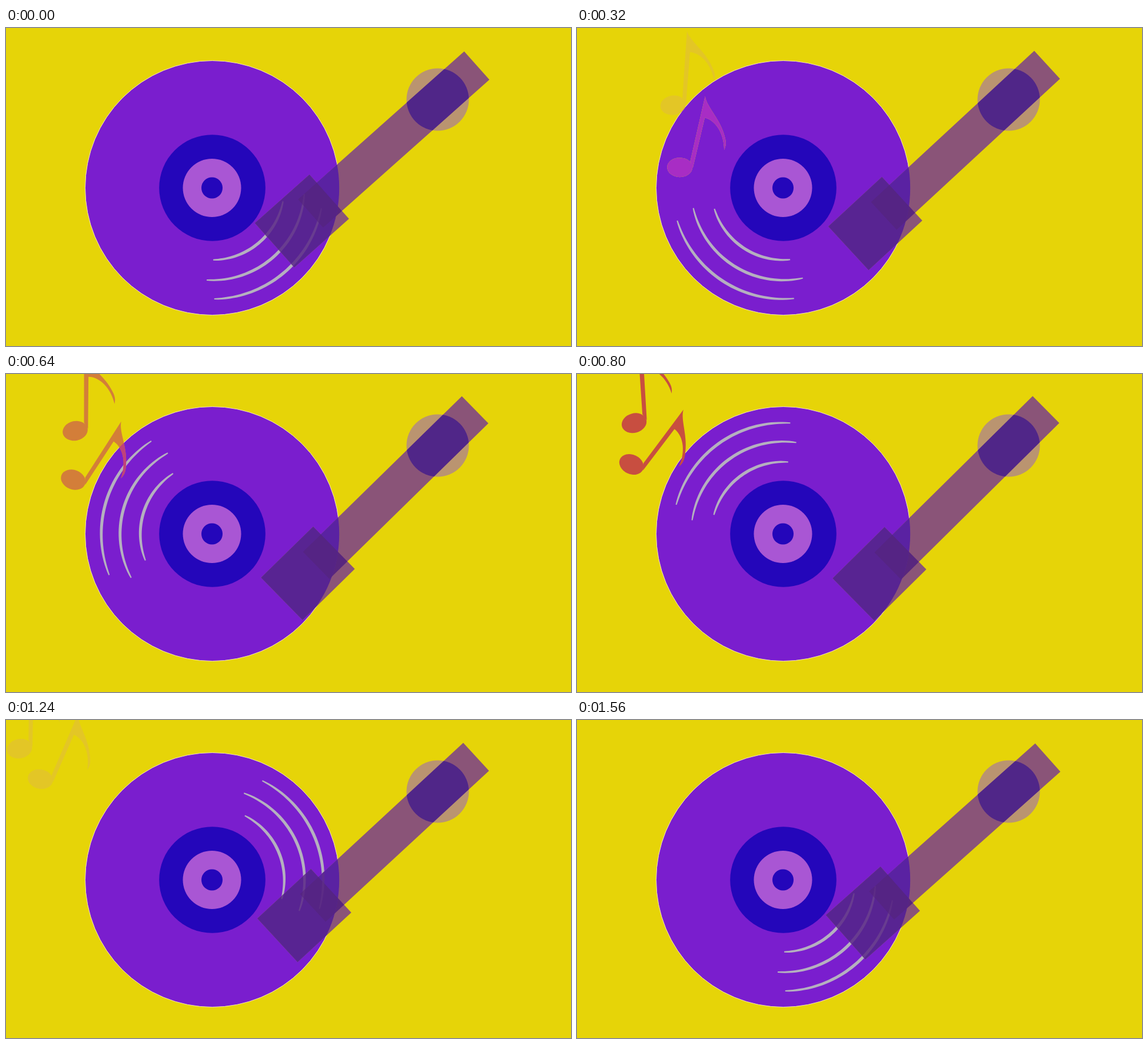
An HTML page with a canvas that plays this animation: 960 by 540 pixels, repeating every 1600 ms.

```html
<!DOCTYPE html>
<html lang="en">
<head>
<meta charset="utf-8">
<title>Turntable</title>
<style>
  html, body { margin: 0; width: 100%; height: 100%; overflow: hidden; background: #e6d408; }
  canvas { display: block; width: 960px; height: 540px; }
</style>
</head>
<body>
<canvas id="stage" width="960" height="540"></canvas>
<script>
const ctx = document.getElementById('stage').getContext('2d');
const TAU = Math.PI * 2, RAD = Math.PI / 180;
const STEP = 40, STEPS = 40, LAST = STEPS - 1;

const YELLOW = [230, 212, 8], PURPLE = [122, 30, 206], RED = [200, 76, 64];
const BLUE = '#2406ba', PINK = '#a956d4', GREY = '#b5b0bf';
const CX = 350.5, CY = 271.5;

const rgb = c => `rgb(${c.map(Math.round).join()})`;
const clamp = x => Math.min(1, Math.max(0, x));

function circle(x, y, r) {
  const p = new Path2D();
  p.arc(x, y, r, 0, TAU);
  return p;
}

const DISC = circle(CX, CY, 215.7);
const PIVOT = [733.5, 121.5];
const KNOB = circle(...PIVOT, 53);

function fill(path, color) {
  ctx.fillStyle = color;
  ctx.fill(path);
}

function clipped(path, draw) {
  ctx.save();
  ctx.clip(path);
  draw();
  ctx.restore();
}

// Arc that thins out towards both ends
function groove(r, from, to) {
  const p = new Path2D(), n = 40;
  const put = (s, side) => {
    const a = (from + (to - from) * s) * RAD;
    const q = r + side * (1 + 1.6 * Math.sin(Math.PI * s) ** .6);
    p.lineTo(CX + q * Math.cos(a), CY + q * Math.sin(a));
  };
  for (let i = 0; i <= n; i++) put(i / n, 1);
  for (let i = n; i >= 0; i--) put(i / n, -1);
  p.closePath();
  return p;
}

function drawRecord(turn) {
  fill(DISC, rgb(PURPLE));
  ctx.strokeStyle = '#f0dcbe';
  ctx.lineWidth = 1;
  ctx.stroke(circle(CX, CY, 216));
  fill(circle(CX, CY, 90.3), BLUE);
  fill(circle(CX - .5, CY, 49.5), PINK);
  fill(circle(CX - .5, CY, 18), BLUE);

  const grooves = [
    groove(122.3, turn + 10.7, turn + 89.3),
    groove(156.7, turn + 3.9, turn + 93.5),
    groove(188.6, turn + 10.6, turn + 89)
  ];
  grooves.forEach(g => fill(g, GREY));
  return grooves;
}

// The see-through arm: one flat tone for each overlap
function drawArm(swing, grooves) {
  const m = new DOMMatrix().translate(...PIVOT).rotate(138.35 - 3 * swing);
  const box = (...rect) => {
    const r = new Path2D(), p = new Path2D();
    r.rect(...rect);
    p.addPath(r, m);
    return p;
  };
  const arm = box(-88, -33.2, 378, 64.4);
  const head = box(247.3, -51.2, 124.2, 101);
  const joint = box(247.3, -33.2, 42.7, 64.4);
  const layer = (path, color, line) => clipped(path, () => {
    fill(path, color);
    grooves.forEach(g => fill(g, line));
  });

  fill(KNOB, '#ba9470');
  fill(arm, '#8a5478');
  fill(head, '#8a5478');
  fill(joint, '#58267e');
  clipped(KNOB, () => fill(arm, '#502688'));
  clipped(DISC, () => {
    layer(arm, '#5a22a2', '#5e2c90');
    layer(head, '#582492', '#683c90');
    layer(joint, '#552484', '#5c2c86');
  });
}

const NOTE = new Path2D('M16-13L24-126C29-108 56-92 68-62C72-53 72-48 70-41C66-66 50-88 29-90L22-2Z');
const BULB = new Path2D();
BULB.ellipse(0, 0, 21.5, 16.5, -8 * RAD, 0, TAU);

function drawNote({ x, y, angle }, color) {
  ctx.save();
  ctx.translate(x, y);
  ctx.rotate(angle * RAD);
  ctx.translate(-40, 63);
  fill(NOTE, color);
  fill(BULB, color);
  ctx.restore();
}

// Tips over slowly, then springs back
const highNote = n => ({
  x: 253 - 6.25 * n,
  y: 113.4 - 6.19 * n + .0644 * n * n,
  angle: -17 * Math.min(clamp((n - 6) / 20.5) ** 2, clamp((32 - n) / 5))
});

// Rocks along one smooth wave
const lowNote = n => ({
  x: 275.6 - 6.94 * n + .0587 * n * n,
  y: 210.3 - 3.26 * n - .0574 * n * n,
  angle: 33 * Math.cos((n - 21.3) * 5.6 * RAD)
});

// Each channel fades to red along its own power curve
const tint = (from, powers, t) =>
  rgb(from.map((c, i) => c + (RED[i] - c) * t ** powers[i]));

function drawNotes(n, ramp) {
  const t = Math.min(1, ramp * 1.02);
  const notes = [highNote(n), lowNote(n)];
  const paint = color => notes.forEach(note => drawNote(note, color));
  paint(tint(YELLOW, [2.6, 2.6, .7], t));
  clipped(DISC, () => paint(tint(PURPLE, [.6, 1.3, 3], t)));
}

function draw(n) {
  const p = n / LAST;
  const ramp = 1 - Math.abs(2 * p - 1);

  ctx.fillStyle = rgb(YELLOW);
  ctx.fillRect(0, 0, 960, 540);
  const grooves = drawRecord(360 * p);
  drawArm(ramp * ramp * (3 - 2 * ramp), grooves);
  if (ramp > 0) drawNotes(n, ramp);
}

function tick(now) {
  draw(Math.floor(now / STEP + .01) % STEPS);
  requestAnimationFrame(tick);
}

draw(0);
requestAnimationFrame(tick);
</script>
</body>
</html>
```
